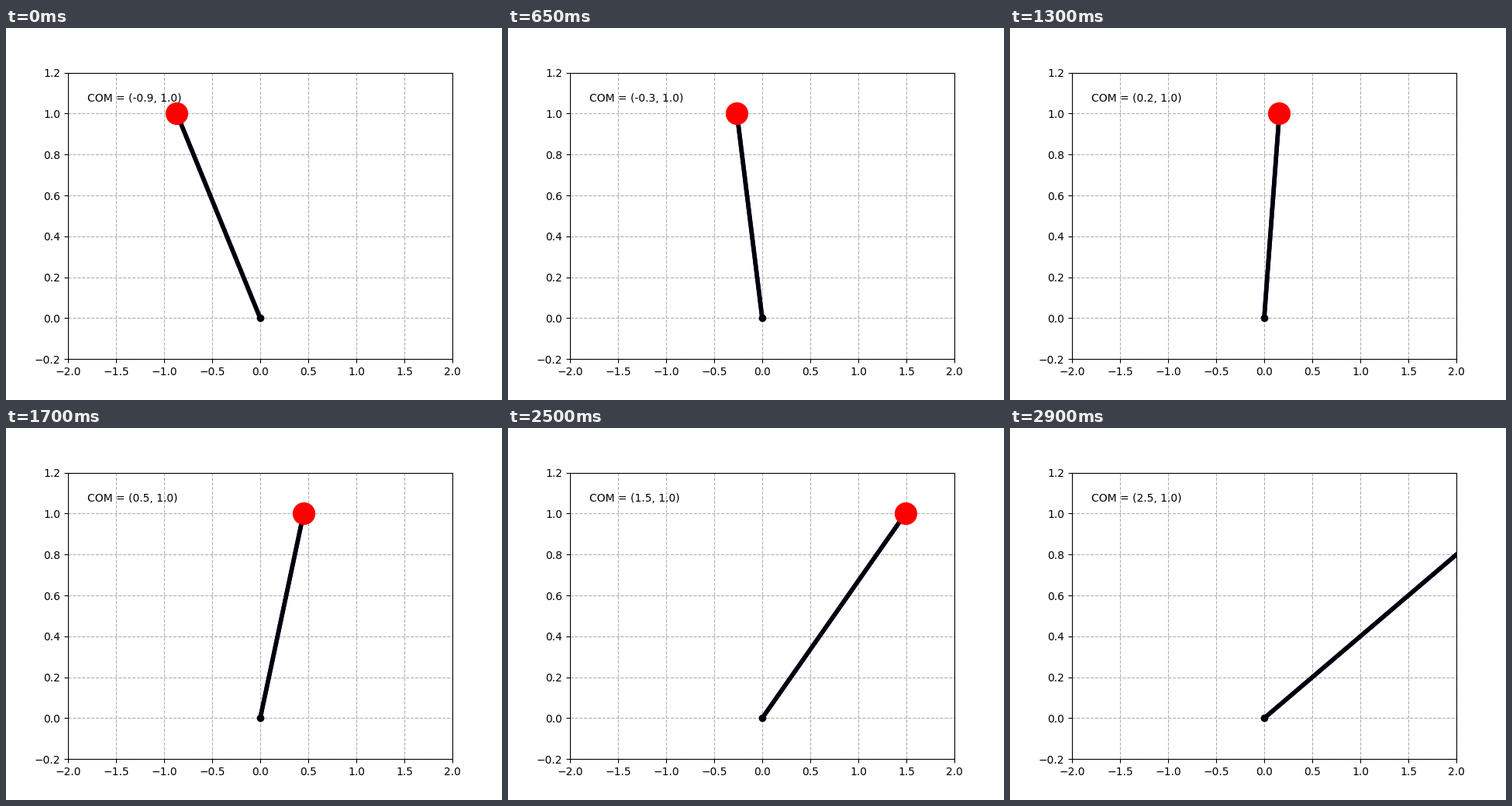
A matplotlib script for the animation above (2.95 s loop, 640 by 480 pixels).

```python
import numpy as np
import matplotlib.pyplot as plt
from matplotlib.animation import FuncAnimation

# Linear inverted pendulum at constant height
G, Z = 9.8, 1.0
X0, V0 = -1.0, 3.5
DT = 0.02
LEAD = 2  # steps already taken when the loop starts
FRAMES, INTERVAL = 59, 50

OMEGA = np.sqrt(G / Z)


def com_x(step):
    phase = OMEGA * DT * step
    return X0 * np.cosh(phase) + V0 / OMEGA * np.sinh(phase)


fig, ax = plt.subplots(figsize=(6.4, 4.8), dpi=100)
ax.set_xlim(-2, 2)
ax.set_ylim(-0.2, 1.2)
ax.grid(linestyle="--")

under, = ax.plot([], [], "b-", lw=4)
rod, = ax.plot([], [], "ko-", lw=4)
mass, = ax.plot([], [], "ro", markersize=20)
label = ax.text(0.05, 0.9, "", transform=ax.transAxes)


def update(i):
    x = com_x(i + LEAD)
    for line in (under, rod):
        line.set_data([0, x], [0, Z])
    mass.set_data([x], [Z])
    label.set_text(f"COM = ({x:.1f}, {Z:.1f})")
    return under, rod, mass, label


anim = FuncAnimation(fig, update, frames=FRAMES, interval=INTERVAL,
                     repeat=True, repeat_delay=0)
plt.show()
```
